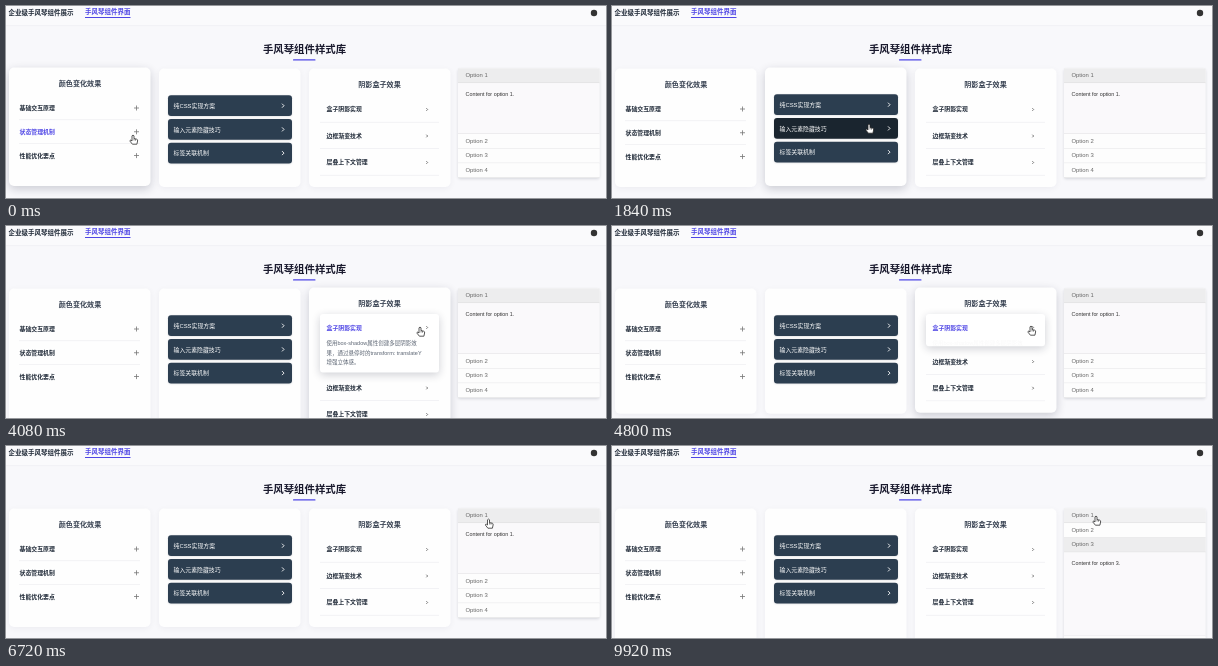
Recreate the animation shown at these times as an HTML page with a canvas. Size 600 by 192 pixels, loop 10000 ms.

```html
<!DOCTYPE html>
<html lang="zh-CN">
<head>
<meta charset="utf-8">
<title>手风琴组件样式库</title>
<style>
  html, body { margin: 0; width: 100%; height: 100%; overflow: hidden; background: #f8f8fb; }
  canvas { display: block; }
</style>
</head>
<body>
<canvas id="stage" width="600" height="192"></canvas>
<script>
const ctx = document.getElementById('stage').getContext('2d');
const LOOP = 10000;
const FONT = '"Liberation Sans", "Noto Sans CJK SC", "Noto Sans CJK", sans-serif';
const INK = '#1f2937', PURPLE = '#4f46e5', NAVY = '#2c3e50', NAVY_HOVER = '#1a252f';
const CARD_TOP = 62.5, CARD_W = 141.5, CARD_X = [3, 153, 303, 452];

// Pointer stops: time, x, y of the fingertip
const POINTER = [
  [0, 127, 129], [60, 127, 129], [560, 257, 118], [2080, 257, 118],
  [2580, 414, 101], [4150, 414, 101], [4300, 419, 100], [4960, 419, 100],
  [5150, 419, 128], [6340, 419, 128], [6680, 482.5, 73], [7160, 482.5, 73],
  [7200, 484.5, 71], [7340, 484.5, 71], [7840, 492, 134], [8500, 492, 134],
  [9000, 489, 161], [9360, 489, 161], [9840, 484, 70], [LOOP, 484, 70]
];

const clamp = v => Math.max(0, Math.min(1, v));
const ease = u => u * u * (3 - 2 * u);
const ramp = (t, start, length) => ease(clamp((t - start) / length));
const pulse = (t, open, close, length) => ramp(t, open, length) - ramp(t, close, length);

function pointerAt(t) {
  const i = POINTER.findIndex(stop => stop[0] > t);
  const [t0, x0, y0] = POINTER[i - 1], [t1, x1, y1] = POINTER[i];
  const u = ease((t - t0) / (t1 - t0));
  return { x: x0 + (x1 - x0) * u, y: y0 + (y1 - y0) * u };
}

const inside = (p, x, y, w, h) => p.x >= x && p.x < x + w && p.y >= y && p.y < y + h;

function text(str, x, y, size, color, weight = 400, align = 'left') {
  ctx.font = `${weight} ${size}px ${FONT}`;
  ctx.textAlign = align;
  ctx.fillStyle = color;
  ctx.fillText(str, x, y + size * 0.37);
}

function rect(x, y, w, h, color) {
  ctx.fillStyle = color;
  ctx.fillRect(x, y, w, h);
}

function box(x, y, w, h, r, color, alpha = 0, blur = 0, drop = 0) {
  ctx.save();
  ctx.shadowColor = `rgba(20, 25, 50, ${alpha})`;
  ctx.shadowBlur = blur;
  ctx.shadowOffsetY = drop;
  ctx.fillStyle = color;
  ctx.beginPath();
  ctx.roundRect(x, y, w, h, r);
  ctx.fill();
  ctx.restore();
}

function stroke(points, color, width) {
  ctx.beginPath();
  points.forEach(([x, y]) => ctx.lineTo(x, y));
  ctx.strokeStyle = color;
  ctx.lineWidth = width;
  ctx.stroke();
}

const chevron = (x, y, r, color) =>
  stroke([[x - r / 2, y - r], [x + r / 2, y], [x - r / 2, y + r]], color, 0.9);

function clipped(x, y, w, h, draw) {
  if (h <= 0) return;
  ctx.save();
  ctx.beginPath();
  ctx.rect(x, y, w, h);
  ctx.clip();
  draw();
  ctx.restore();
}

function drawHeader() {
  rect(0, 0, 600, 19.5, '#fafafc');
  rect(0, 19.5, 600, 0.7, '#eeeef2');
  text('企业级手风琴组件展示', 2.5, 6.5, 6.5, INK, 700);
  text('手风琴组件界面', 79, 6, 6.5, PURPLE, 700);
  rect(79, 11, 45.5, 1, PURPLE);
  ctx.fillStyle = '#333';
  ctx.beginPath();
  ctx.arc(588, 7, 3.2, 0, Math.PI * 2);
  ctx.fill();
  text('手风琴组件样式库', 298.5, 43.5, 10.4, '#1a1a2e', 700, 'center');
  box(287, 53.2, 22.5, 1.3, 0.6, PURPLE);
}

// Draws a card and returns the vertical lift of its contents
function drawCard(index, bottom, p) {
  const x = CARD_X[index];
  const hover = inside(p, x, CARD_TOP, CARD_W, bottom - CARD_TOP);
  const lift = hover ? -1 : 0;
  box(x, CARD_TOP + lift, CARD_W, bottom - CARD_TOP, 5, '#fefefe',
    hover ? 0.2 : 0.05, hover ? 10 : 6, hover ? 3 : 1.5);
  return lift;
}

function drawColorCard(bottom, p) {
  const lift = drawCard(0, bottom, p);
  text('颜色变化效果', 74, 78 + lift, 7.1, '#374151', 700, 'center');
  ['基础交互原理', '状态管理机制', '性能优化要点'].forEach((label, i) => {
    const y = 103 + i * 23.8 + lift;
    const hover = inside(p, 13, y - 12, 121, 23.8);
    text(label, 13.5, y, 5.9, hover ? PURPLE : INK, 700);
    rect(128, y - 0.4, 5, 0.8, '#777');
    rect(130.1, y - 2.5, 0.8, 5, '#777');
    if (i < 2) rect(13, y + 11.5, 121, 0.6, '#ececf0');
  });
  return inside(p, 13, 91, 121, 71);
}

function drawDarkCard(bottom, grow, p) {
  const lift = drawCard(1, bottom, p);
  let over = false;
  ['纯CSS实现方案', '输入元素隐藏技巧', '标签关联机制'].forEach((label, i) => {
    const y = 89.3 + i * 23.7 + lift + (i === 2 ? grow : 0);
    const hover = inside(p, 162, y, 124, 20.7);
    over = over || hover;
    box(162, y, 124, 20.7, 3, hover ? NAVY_HOVER : NAVY, 0.15, 2, 0.5);
    text(label, 167.5, y + 10.4, 5.9, '#fff', 500);
    chevron(277, y + 10.4, 2, '#fff');
  });
  const top = 134 + lift;
  clipped(162, top, 124, grow + 1, () => {
    text('通过position:absolute和opacity:0隐藏input', 168, top + 8.5, 5.1, '#4b5563');
    text('元素，保持可访问性的同时美化界面。', 168, top + 17, 5.1, '#4b5563');
  });
  return over;
}

const SHADOW_ITEMS = [
  ['盒子阴影实现', '使用box-shadow属性创建多层阴影效', '果，通过悬停时的transform: translateY', '增强立体感。'],
  ['边框渐变技术', '使用border-image属性实现边框的渐', '变效果，通过悬停时的颜色过渡', '增强层次感。'],
  ['层叠上下文管理']
];

function drawShadowCard(bottom, opened, p) {
  const lift = drawCard(2, bottom, p);
  text('阴影盒子效果', 373.5, 78 + lift, 7.1, '#374151', 700, 'center');
  let y = 90 + lift, over = false;
  SHADOW_ITEMS.forEach(([label, ...lines], i) => {
    const grow = 33 * opened[i], h = 26.5 + grow;
    const hover = inside(p, 314, y, 119, h);
    const rise = hover ? -1 : 0;
    over = over || hover;
    if (hover) box(314, y + rise, 119, h - 1, 3, '#fff', 0.2, 9, 2.5);
    else rect(314, y + h - 0.6, 119, 0.6, '#ececf0');
    text(label, 320.5, y + 13.2 + rise / 2, 5.9, hover ? PURPLE : INK, 700);
    chevron(421, y + 13.5 + rise, 1.3, '#666');
    const top = y;
    clipped(314, top + 20, 119, grow + 4, () => {
      ctx.globalAlpha = opened[i] ** 2;
      lines.forEach((line, k) => text(line, 320.5, top + 28 + k * 9.5, 5.5, '#5b6472'));
    });
    y += h;
  });
  return over;
}

function drawOptions(contents, p) {
  const x = CARD_X[3];
  let y = CARD_TOP, over = false;
  const total = 4 * 14.6 + contents.reduce((a, b) => a + b, 0);
  box(x, y, CARD_W, total, 2, '#fdfdfd', 0.15, 3, 1);
  contents.forEach((height, i) => {
    const hover = inside(p, x, y, CARD_W, 14.6);
    over = over || hover;
    rect(x, y, CARD_W, 14.6, height > 5 ? '#ededee' : hover ? '#f1f1f2' : '#fdfdfd');
    text(`Option ${i + 1}`, 459.5, y + 6.3, 5.9, '#666');
    y += 14.6;
    rect(x, y - 0.6, CARD_W, 0.6, '#dedee0');
    const top = y;
    clipped(x, top, CARD_W, height, () => {
      rect(x, top, CARD_W, height, '#faf9fb');
      text(`Content for option ${i + 1}.`, 459.5, top + 10.8, 5.4, '#333');
      rect(x, top + height - 0.6, CARD_W, 0.6, '#dedee0');
    });
    y += height;
  });
  return over;
}

const HAND = 'M-1 .8Q0-.6 1 .8V3.6L3.8 4.2Q4.9 4.5 4.6 6L3.9 9.2H-.6L-3 6.2Q-3.2 5-2.2 5.1L-1 6Z';
const ARROW = 'M0 0V7.2L1.7 5.7L2.9 8.3L4 7.8L2.8 5.3H5Z';

function drawPointer(p, clickable) {
  const shape = new Path2D(clickable ? HAND : ARROW);
  ctx.save();
  ctx.translate(p.x, p.y);
  ctx.fillStyle = '#fff';
  ctx.strokeStyle = '#222';
  ctx.lineWidth = 0.75;
  ctx.fill(shape);
  ctx.stroke(shape);
  if (clickable) {
    stroke([[1, 3.5], [1, 5.5]], '#222', 0.5);
    stroke([[2.5, 4], [2.5, 5.7]], '#222', 0.5);
  }
  ctx.restore();
}

function draw(t) {
  const p = pointerAt(t);
  const darkGrow = 19.5 * pulse(t, 640, 1500, 350);
  const shadowOpen = [pulse(t, 2680, 4445, 500), pulse(t, 5200, 5900, 500), 0];
  const second = ramp(t, 8080, 220), third = ramp(t, 9200, 220);
  const contents = [51 * (1 - second), 66 * (second - third), 84 * third, 0];

  const optionsBottom = CARD_TOP + 58.4 + contents.reduce((a, b) => a + b, 0);
  const bottom = Math.max(181, 169 + darkGrow,
    181 + 33 * (shadowOpen[0] + shadowOpen[1]), optionsBottom - 6);

  rect(0, 0, 600, 192, '#f8f8fb');
  drawHeader();
  const clickable = [
    drawColorCard(bottom, p),
    drawDarkCard(bottom, darkGrow, p),
    drawShadowCard(bottom, shadowOpen, p),
    drawOptions(contents, p)
  ].some(Boolean);
  drawPointer(p, clickable);
}

function tick() {
  draw(performance.now() % LOOP);
  requestAnimationFrame(tick);
}
tick();
</script>
</body>
</html>
```
